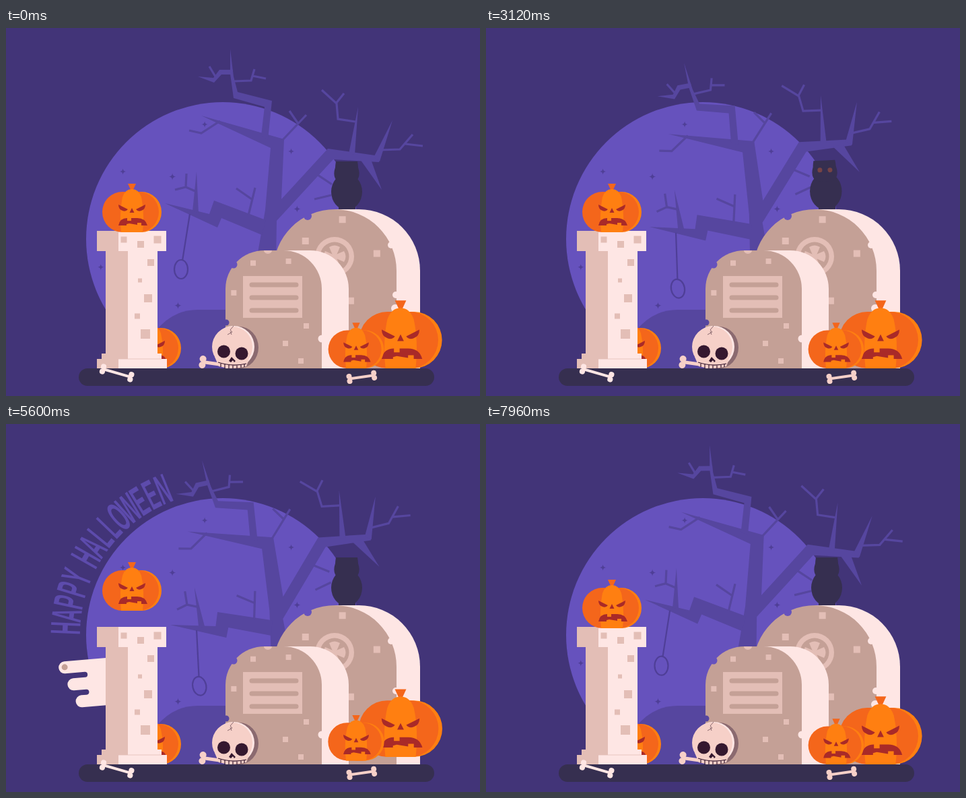
These frames come from a looping animation (704x546 px, 8000 ms). An HTML page:

```html
<!DOCTYPE html>
<html lang="en">
<head>
<meta charset="utf-8">
<title>Happy Halloween</title>
<style>
html, body { margin: 0; width: 100%; height: 100%; overflow: hidden; background: #423478; }
svg { display: block; width: 100vw; height: 100vh; }
.twig { fill: none; stroke: #56469f; stroke-width: 3.2; }
.lo { fill: #c4a096; }
.mid { fill: #e3beb6; }
.hi { fill: #fee6e4; }
.dark { fill: #362f50; }
.hill { fill: #56469f; }
.bone { fill: #f6d0c8; }
#words { font: bold 63px "Liberation Sans", Arial, sans-serif; text-anchor: middle; fill: #5d4bac; }
</style>
</head>
<body>
<svg viewBox="0 0 704 546">
  <defs>
    <g id="pumpkin">
      <path d="M-6-72H6L1-61H-1Z" fill="#f4661b"/>
      <rect x="-30" y="-60" width="74" height="60" rx="30" fill="#ff7f11"/>
      <rect x="-44" y="-60" width="84" height="60" rx="30" fill="#f4661b"/>
      <path d="M-16 0Q-19-30-14-52Q-10-64 0-64Q10-64 14-52Q19-30 16 0Z" fill="#ff7f11"/>
      <g fill="#a92a28">
        <path id="eye" d="M-20-41L-6-34Q-9-30-14-32Q-20-34-20-41Z"/>
        <use href="#eye" transform="scale(-1 1)"/>
        <path d="M0-36L-3.5-29H3.5ZM-20-10Q-18-21-7-21V-17H-1V-21H8Q20-21 23-10H14V-14H8V-11L-4-13-8-12V-10Z"/>
      </g>
    </g>
    <clipPath id="shaft"><rect x="140" y="331" width="85" height="152"/></clipPath>
    <mask id="chips" maskUnits="userSpaceOnUse" x="0" y="0" width="704" height="546">
      <rect width="704" height="546" fill="#fff"/>
      <circle cx="448" cy="279" r="6"/><circle cx="338" cy="351" r="5.5"/><circle cx="327" cy="437" r="4.5"/>
    </mask>
  </defs>
  <rect width="704" height="546" fill="#423478"/>
  <circle cx="322" cy="313" r="203" fill="#6652bd"/>
  <g id="stars" fill="#4f3f97"></g>
  <path class="hill" d="M222 505V450Q247 418 285 418H345V505Z"/>

  <g id="tree">
    <g class="hill">
      <path d="M372 345L385 270 393 178 290 130 413 165 409 254 478 179 555 190 554 199 486 195 402 286 401 345Z"/>
      <path d="M379 160L384 117 338 104 333 68 333 31 338 72 344 95 395 108 389 166Z"/>
      <path d="M337 62H317L308 74 285 72 309 81 320 69H337Z"/>
      <path d="M236 260L302 276 309 256 386 285 380 307 320 282 314 296Z"/>
      <path d="M277 272L283 213 286 275ZM509 187L523 117 518 188ZM546 192L574 137 555 198ZM526 195L558 240 542 195Z"/>
    </g>
    <path class="twig" d="M302 57L311 72M338 79L364 78 369 61M366 71L386 75M411 166L446 129M421 123L434 142M318 138L290 156 272 152
      M283 243L267 236 268 216M251 240L267 236M360 278L370 237M342 238L365 254M463 218L484 232M458 254L483 248
      M519 139L493 135 491 112 469 92M490 112L502 97M556 181L585 180 604 158M593 172L619 175"/>
    <g fill="none" stroke="#4f3f97" stroke-width="2.2">
      <path d="M273 276L262 345"/><ellipse cx="260" cy="358" rx="10" ry="14"/>
    </g>
  </g>

  <g id="words"></g>

  <g id="ghost">
    <path class="hi" d="M-35 0A35 35 0 0 1 35 0V62a9 9 0 0 1-18 0V54a4 4 0 0 0-8 0V72a9 9 0 0 1-18 0V54a4 4 0 0 0-8 0V83a9 9 0 0 1-18 0Z"/>
    <ellipse id="hand" class="hi" cx="-34" cy="3" rx="7" ry="5" transform="rotate(-40 -34 3)"/>
    <g class="lo">
      <ellipse cx="-3" cy="-6" rx="4" ry="5"/>
      <ellipse cx="16" cy="-6" rx="4" ry="5"/>
      <circle cx="-26.5" cy="83" r="4.5"/>
      <path id="mouth"/>
    </g>
  </g>

  <g class="dark">
    <path d="M494 262h7v9h-7zM512 262h7v9h-7z"/>
    <ellipse id="owlBody" cx="506" cy="243" rx="23" ry="27"/>
    <g id="owlHead">
      <path d="M490 198H522Q523 204 523 207Q528 222 518 229H494Q484 222 489 207Q489 204 490 198Z"/>
      <g id="owlEyes" fill="#b9593b"><circle cx="499" cy="212" r="3.5"/><circle cx="514" cy="212.5" r="3.5"/></g>
    </g>
  </g>

  <g mask="url(#chips)">
    <path class="hi" d="M489 269H524A91 91 0 0 1 615 360V505H489Z"/>
    <path class="lo" d="M397 505V360A91.5 91 0 0 1 580 360V505Z"/>
  </g>
  <g class="hi">
    <circle cx="572" cy="322" r="5"/><circle cx="579" cy="396" r="5"/><circle cx="578" cy="416" r="6"/>
  </g>
  <circle class="mid" cx="488" cy="339" r="29"/>
  <circle class="lo" cx="488" cy="339" r="21.5"/>
  <g id="cross" class="mid"></g>
  <g id="backDots" class="mid"></g>

  <g mask="url(#chips)">
    <path class="hi" d="M400 330H452A57 57 0 0 1 509 387V505H400Z"/>
    <path class="lo" d="M326 505V387A58 57 0 0 1 384 330H412A57 57 0 0 1 469 387V505Z"/>
  </g>
  <path class="mid" d="M383 330a6 5 0 0 0 12 0Z"/>
  <circle class="hi" cx="469" cy="461" r="5.5"/>
  <rect class="mid" x="352" y="368" width="88" height="62"/>
  <path d="M365 381H431M365 400H431M365 419H431" stroke="#c4a096" stroke-width="7" stroke-linecap="round"/>
  <g id="frontDots" class="mid"></g>

  <use href="#pumpkin" transform="translate(216 505)"/>

  <path class="hi" d="M167 301H238V331H225V483H231V491H239V505H167Z"/>
  <path class="mid" d="M135 301H167V331H181V491H167V505H135V491H142V483H148V331H135Z"/>
  <g id="columnDots" class="mid"></g>
  <path d="M142 491H231" stroke="#e3beb6" stroke-width=".8"/>
  <g clip-path="url(#shaft)">
    <g id="spider" fill="#43163a">
      <ellipse cy="2" rx="5" ry="5.5"/><circle cy="-5" r="3"/>
      <path id="legs" fill="none" stroke="#43163a" stroke-width="1.1" d="M0-3L-9-8-11-3M0-2L-12-4-16 0M0 0L-11 2-14 8M0 1L-8 5-9 10"/>
      <use href="#legs" transform="scale(-1 1)"/>
    </g>
  </g>

  <use id="topPumpkin" href="#pumpkin"/>
  <use id="bigPumpkin" href="#pumpkin"/>
  <use id="smallPumpkin" href="#pumpkin"/>

  <g id="backBone" class="bone"></g>
  <g id="skull">
    <ellipse cx="346" cy="474" rx="29" ry="31" fill="#8b6a70"/>
    <circle class="hi" cx="338" cy="473" r="31"/>
    <circle class="bone" cx="336" cy="473" r="30"/>
    <path class="bone" d="M310 488H362L357 502Q336 508 316 502Z"/>
    <g fill="#35182f">
      <circle cx="323.5" cy="480" r="9.5"/><circle cx="350" cy="483" r="9.5"/>
      <path d="M335 488L331 494 334 496 337 493 339 496 341 494Z"/>
    </g>
    <path d="M315 496Q336 503 357 498M319 498V503M325 499V505M331 500V505M337 500V505M343 500V505M349 500V504M354 499V503" fill="none" stroke="#35182f" stroke-width="1.2"/>
    <path d="M338 442L333 448 336 451 329 455M333 450L335 455" fill="none" stroke="#8b6a70"/>
  </g>

  <rect class="dark" x="108" y="505" width="528" height="26" rx="13"/>
  <g id="leftBone" class="hi"></g>
  <g id="rightBone" class="bone"></g>
</svg>
<script>
const $ = id => document.getElementById(id);
const set = (id, move) => $(id).setAttribute('transform', move);
const fade = (id, opacity) => $(id).setAttribute('opacity', opacity);
const ramp = (t, a, b) => Math.max(0, Math.min(1, (t - a) / (b - a)));
const repeat = (n, make) => Array.from({ length: n }, (_, i) => make(i)).join('');

// Stone squares, given by their centre
const square = (x, y, s) => `<rect x="${x - s / 2}" y="${y - s / 2}" width="${s}" height="${s}"/>`;
const polar = (cx, cy, r, degrees) => {
  const a = degrees * Math.PI / 180;
  return [cx + r * Math.cos(a), cy + r * Math.sin(a)];
};
$('backDots').innerHTML = repeat(4, i => square(...polar(488, 339, 49 + 7 * i, -152 + 74 * i), 10));
$('frontDots').innerHTML =
  repeat(3, i => square(...polar(396, 399, 58, -174 + 54 * i), 8)) +
  repeat(3, i => square(446 - 4 * i - 27 * (i % 2), 442 + 26 * i, 8));
$('columnDots').innerHTML =
  repeat(3, i => square(175 + 25 * i, 314 + 7 * (i % 2), 9 + i)) +
  repeat(5, i => square(215 - 2 * i - 14 * (i % 2), 348 + 26.5 * i, 10 + i - 5 * (i % 2)));

const star = (r, angle, s) => `<path transform="translate(${polar(322, 313, r, angle)}) scale(${s})"
  d="M0-1Q.1-.1 1 0Q.1.1 0 1Q-.1.1-1 0Q-.1-.1 0-1"/>`;
$('stars').innerHTML = repeat(3, i => star(119, -22 - 107 * i, 5)) + repeat(4, i => star(165 + 7 * i, -52 - 47 * i, 4.5));
$('cross').innerHTML = repeat(4, i => `<path transform="translate(488 339) rotate(${90 * i})" d="M-2 0L-8-14Q0-19 8-14L2 0Z"/>`);

function bone(id, x, y, length, angle, size) {
  set(id, `translate(${x} ${y}) rotate(${angle})`);
  const knob = (cx, cy) => `<circle cx="${cx}" cy="${cy}" r="${size}"/>`;
  $(id).innerHTML = `<rect y="${-size / 2}" width="${length}" height="${size}"/>` +
    repeat(4, i => knob(i > 1 ? length : 0, i % 2 ? size * .9 : -size * .9));
}
bone('leftBone', 144, 506, 43, 16, 4.1);
bone('rightBone', 510, 520.5, 37, -8, 4);
bone('backBone', 292, 495.5, 40, 8, 5);

// Condensed lettering around the moon
$('words').innerHTML = [...'HAPPY HALLOWEEN'].map((c, i) => {
  const angle = 2.5 + 4.78 * i - (i > 5 ? 1.7 : 0) - 90;
  return `<text transform="translate(322 313) rotate(${angle}) translate(0 -212) scale(.42 1)">${c}</text>`;
}).join('');

// Flight of the ghost: time, x, y, angle
const flight = [
  [400, 186, 362, 0],
  [1360, 279.5, 250, 0],
  [2360, 411, 188, 0],
  [3360, 415, 110, -35],
  [3880, 325, 50, -64],
  [4800, 98, 218, -150],
  [5300, 98, 345, -220],
  [5900, 258, 394, -325],
  [6440, 358, 368, -367],
  [7000, 395, 420, -360]
];

// Smooth curve through the keys
function sample(keys, time) {
  const last = keys.length - 1, t = Math.max(keys[0][0], Math.min(keys[last][0], time));
  let i = 0;
  while (i < last - 1 && keys[i + 1][0] <= t) i++;
  const a = keys[i], b = keys[i + 1], d = b[0] - a[0], u = (t - a[0]) / d;
  const p = keys[Math.max(0, i - 1)], n = keys[Math.min(last, i + 2)];
  return a.map((v, k) => {
    const m = (b[k] - p[k]) / (b[0] - p[0]) * d, q = (n[k] - v) / (n[0] - a[0]) * d;
    return v + u * (m + u * (3 * (b[k] - v) - 2 * m - q + u * (2 * (v - b[k]) + m + q)));
  });
}

function moveGhost(t) {
  const [, x, y, angle] = sample(flight, t);
  set('ghost', `translate(${x} ${y}) rotate(${angle}) scale(${.93 + .07 * ramp(t, 1360, 2360)})`);
  fade('ghost', t < 3000 ? .95 - .95 * ramp(t, 1300, 2700) ** 2 : ramp(t, 3400, 3900) * (1 - ramp(t, 6100, 7200)));
  fade('hand', ramp(t, 6000, 6200));
  const r = 7 + 15 * ramp(t, 3300, 4300) * (1 - ramp(t, 5200, 5800)), base = 15 + .7 * r;
  $('mouth').setAttribute('d', `M${7 - r} ${base}A${r} ${r} 0 0 1 ${7 + r} ${base}Z`);
}

function hop(id, x, y, scale, height, start, period, t) {
  const end = start + 2 * period;
  const h = Math.abs(Math.sin(2 * Math.PI * ramp(t, start, end)));
  const squash = .085 * (1 - h) * ramp(t, start, start + 120) * (1 - ramp(t, end - 60, end + 60));
  set(id, `translate(${x} ${y - height * h}) scale(${scale * (1 + squash)} ${scale * (1 - squash / 3)})`);
}

function draw(t) {
  const ease = (t % 4000 / 4000) ** 1.5;
  set('tree', `rotate(${-16 * (t < 4000 ? ease : 1 - ease)} 421 243)`);
  moveGhost(t);

  const turn = ramp(t, 2120, 2340) * (1 - ramp(t, 3000, 3240));
  set('owlHead', `translate(${-6 * turn} ${-3 * turn}) rotate(${-5 * turn} 506 215)`);
  set('owlBody', `translate(${506 - 2.5 * turn} 270) scale(${1 + .06 * turn}) translate(-506 -270)`);
  fade('owlEyes', turn);

  fade('words', ramp(t, 4600, 5500) * (1 - ramp(t, 6900, 7560)));
  hop('topPumpkin', 187, 303, 1, 26, 5240, 740, t);
  hop('bigPumpkin', 586, 505, 1.4, 12, 5160, 700, t);
  hop('smallPumpkin', 520, 505, .94, 6, 5160, 700, t);
  set('spider', `translate(164 ${505 - (t - 5500) * .1096}) scale(.8)`);
  set('skull', `translate(0 ${-2 * Math.abs(Math.sin(3 * Math.PI * ramp(t, 6900, 7900)))})`);
}

function loop() {
  draw(performance.now() % 8000);
  requestAnimationFrame(loop);
}
loop();
</script>
</body>
</html>
```
